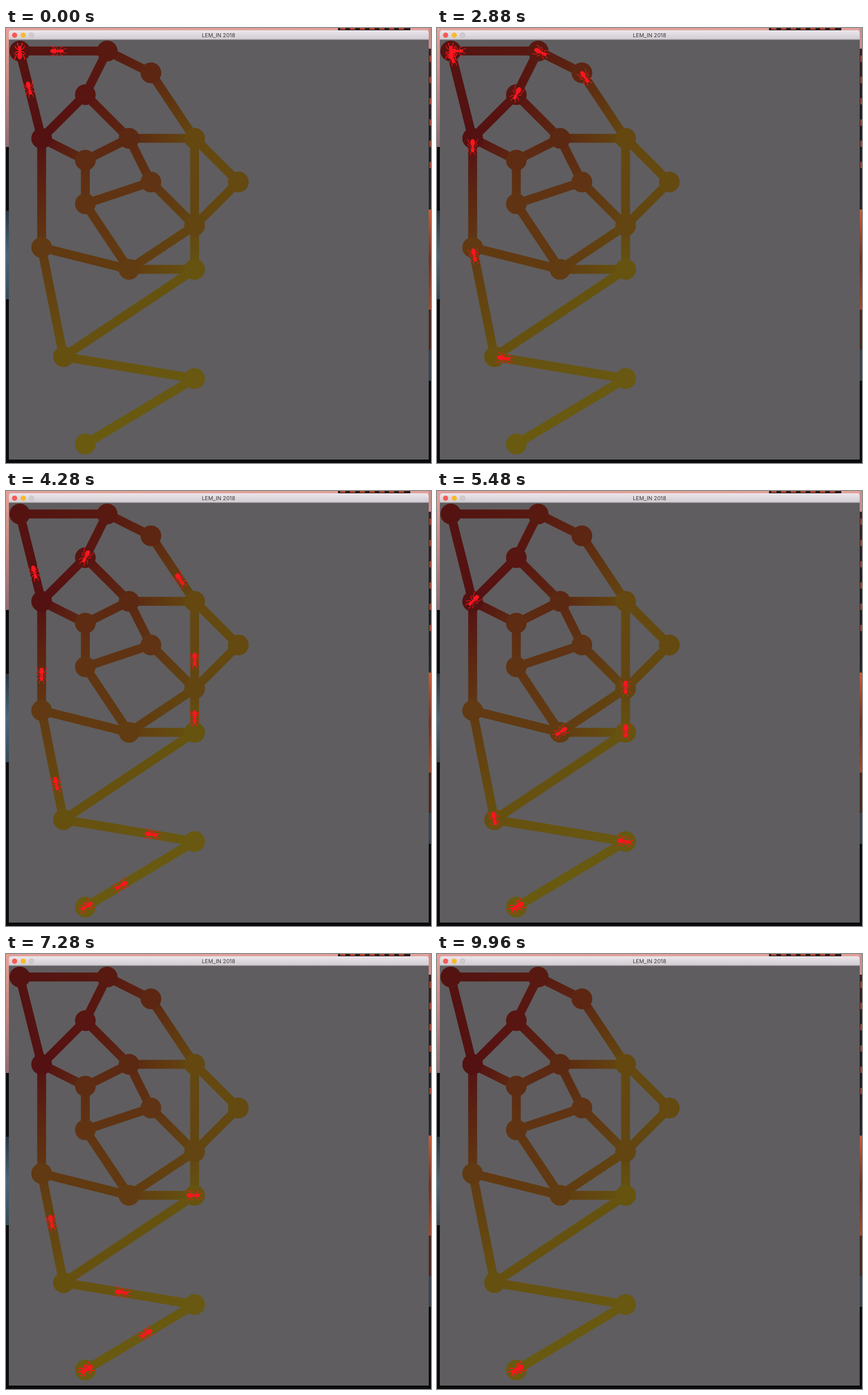
Write an HTML page with a canvas that moves like this. It is 740x757 px and loops after 10 s.

```html
<!DOCTYPE html>
<html lang="en">
<head>
<meta charset="utf-8">
<title>LEM_IN 2018</title>
<style>
  html, body { margin: 0; width: 100%; height: 100%; overflow: hidden; background: #0b0b0d; }
  canvas { display: block; }
</style>
</head>
<body>
<canvas id="stage" width="740" height="757"></canvas>
<script>
const ctx = document.getElementById('stage').getContext('2d');
const LOOP = 10000, MOVE = 480;

// Rooms: grid column, grid row, colour
const rooms = {
  A: [0, 0, '#541311'], B: [4, 0, '#581911'], C: [6, 1, '#5c2613'], D: [3, 2, '#581511'],
  E: [1, 4, '#541112'], F: [5, 4, '#5b2812'], G: [8, 4, '#644810'], H: [3, 5, '#5e2b13'],
  I: [6, 6, '#5f3313'], J: [10, 6, '#644910'], K: [3, 7, '#603413'], L: [8, 8, '#624511'],
  M: [1, 9, '#613912'], N: [5, 10, '#613b11'], O: [8, 10, '#65530f'], P: [2, 14, '#665010'],
  Q: [8, 15, '#685811'], R: [3, 18, '#695a10']
};
const tunnels = ('AB AE BC BD CG DE DF EH FH FG FI EM GJ GL HK IK IL JL ' +
  'KN LN LO MN MP NO OP PQ QR').split(' ');

// Room of each ant after every turn
const routes = ['ABDDDDDDEMMPQR', 'AABCGLOOOPQR', 'AAABCGLNNNOOPQR', 'AAAABCGLLOPQR'];
for (let wait = 1; wait <= 6; wait++) routes.push('A'.repeat(wait) + 'EMPQR');

const turnStarts = [-211, 1574, 2208, 2842, 3398, 3954, 4450, 4955,
  5661, 6362, 7063, 7682, 8301, 8920];

const spot = name => [24 + 38.05 * rooms[name][0], 40 + 38 * rooms[name][1]];

function rect(x, y, w, h, fill) {
  ctx.fillStyle = fill;
  ctx.fillRect(x, y, w, h);
}

function disc(x, y, r, fill) {
  ctx.fillStyle = fill;
  ctx.beginPath();
  ctx.arc(x, y, r, 0, 7);
  ctx.fill();
}

function gradient(x1, y1, x2, y2, ...colors) {
  const g = ctx.createLinearGradient(x1, y1, x2, y2);
  colors.forEach((c, i) => g.addColorStop(i / (colors.length - 1), c));
  return g;
}

function drawDesktop() {
  rect(0, 0, 740, 757, '#0b0b0d');
  rect(0, 0, 740, 6, '#e2a19b');
  rect(0, 0, 5, 207, gradient(0, 0, 0, 207, '#e8a096', '#c58580', '#8d6a72'));
  rect(0, 318, 5, 154, gradient(0, 318, 0, 472, '#26343f', '#48657a', '#35495a'));
  rect(578, 0, 126, 5, '#2a1a1b');
  for (let x = 582; x < 700; x += 17) rect(x, 0, 9, 3, '#b54a33');
  rect(736, 0, 4, 36, '#c98f8c');
  rect(736, 36, 4, 280, gradient(0, 36, 0, 316, '#3a2220', '#1b1a1f', '#25272d'));
  for (let y = 48; y < 260; y += 37) rect(737, y, 3, 11, '#9a432e');
  rect(736, 316, 4, 174, gradient(0, 316, 0, 490, '#cf5a35', '#6d3022', '#a5482d'));
  rect(736, 490, 4, 70, '#4a261f');
  rect(736, 560, 4, 54, '#38434e');
}

function drawWindow() {
  rect(5, 20, 731, 731, '#5f5d5f');
  ctx.fillStyle = gradient(0, 4, 0, 20, '#ece7ec', '#d0ccd1');
  ctx.beginPath();
  ctx.roundRect(5, 4, 731, 16, [4, 4, 0, 0]);
  ctx.fill();
  rect(5, 19.5, 731, 1, '#aaa6aa');
  disc(15, 12.5, 4.5, '#f95a55');
  disc(30, 12.5, 4.5, '#f8b930');
  disc(44.5, 12.5, 4.5, '#b9b4ba');
  disc(44.5, 12.5, 3.9, '#d0cbd1');
  ctx.fillStyle = '#383638';
  ctx.font = '9.5px Inter, Roboto, sans-serif';
  ctx.textAlign = 'center';
  ctx.fillText('LEM_IN 2018', 370, 16);
}

function drawMap() {
  ctx.lineWidth = 15.5;
  for (const [a, b] of tunnels) {
    const p = spot(a), q = spot(b);
    ctx.strokeStyle = gradient(...p, ...q, rooms[a][2], rooms[b][2]);
    ctx.beginPath();
    ctx.moveTo(...p);
    ctx.lineTo(...q);
    ctx.stroke();
  }
  for (const name in rooms) disc(...spot(name), 18, rooms[name][2]);
}

// Ant facing right, centred on the origin
const body = new Path2D(), limbs = new Path2D();
for (const [x, rx, ry] of [[-7, 5.8, 4], [0.5, 3.8, 2], [7, 3.6, 3]]) {
  body.moveTo(x + rx, 0);
  body.ellipse(x, 0, rx, ry, 0, 0, 7);
}
for (const side of [-1, 1]) {
  const limb = (x, ...points) => {
    limbs.moveTo(x, 0);
    for (const [px, py] of points) limbs.lineTo(px, py * side);
  };
  limb(-1, [-5, 6], [-13, 9]);
  limb(0.5, [0, 6], [-4, 9]);
  limb(2.5, [5, 5.5], [10, 8.5]);
  limb(8, [11, 3.5], [15.5, 4]);
}

function drawAnt(x, y, angle) {
  ctx.save();
  ctx.translate(x, y);
  ctx.rotate(angle);
  ctx.translate(-1.5, 0);
  ctx.fillStyle = ctx.strokeStyle = '#fb161d';
  ctx.lineWidth = 1;
  ctx.fill(body);
  ctx.stroke(limbs);
  ctx.restore();
}

function moveAnt(route, turn, progress) {
  const at = n => route[Math.min(n, route.length - 1)];
  const [x1, y1] = spot(at(turn - 1)), [x2, y2] = spot(at(turn));
  // A waiting ant keeps the heading of its last move
  let last = turn;
  while (last > 0 && at(last - 1) === at(last)) last--;
  let angle = -Math.PI / 2;
  if (last > 0) {
    const from = spot(at(last - 1)), to = spot(at(last));
    angle = Math.atan2(to[1] - from[1], to[0] - from[0]);
  }
  drawAnt(x1 + (x2 - x1) * progress, y1 + (y2 - y1) * progress, angle);
}

function frame() {
  const t = performance.now() % LOOP;
  const turn = turnStarts.filter(s => s <= t).length;
  const progress = Math.min(1, (t - turnStarts[turn - 1]) / MOVE);
  drawDesktop();
  drawWindow();
  drawMap();
  for (const route of routes) moveAnt(route, turn, progress);
  requestAnimationFrame(frame);
}
frame();
</script>
</body>
</html>
```
